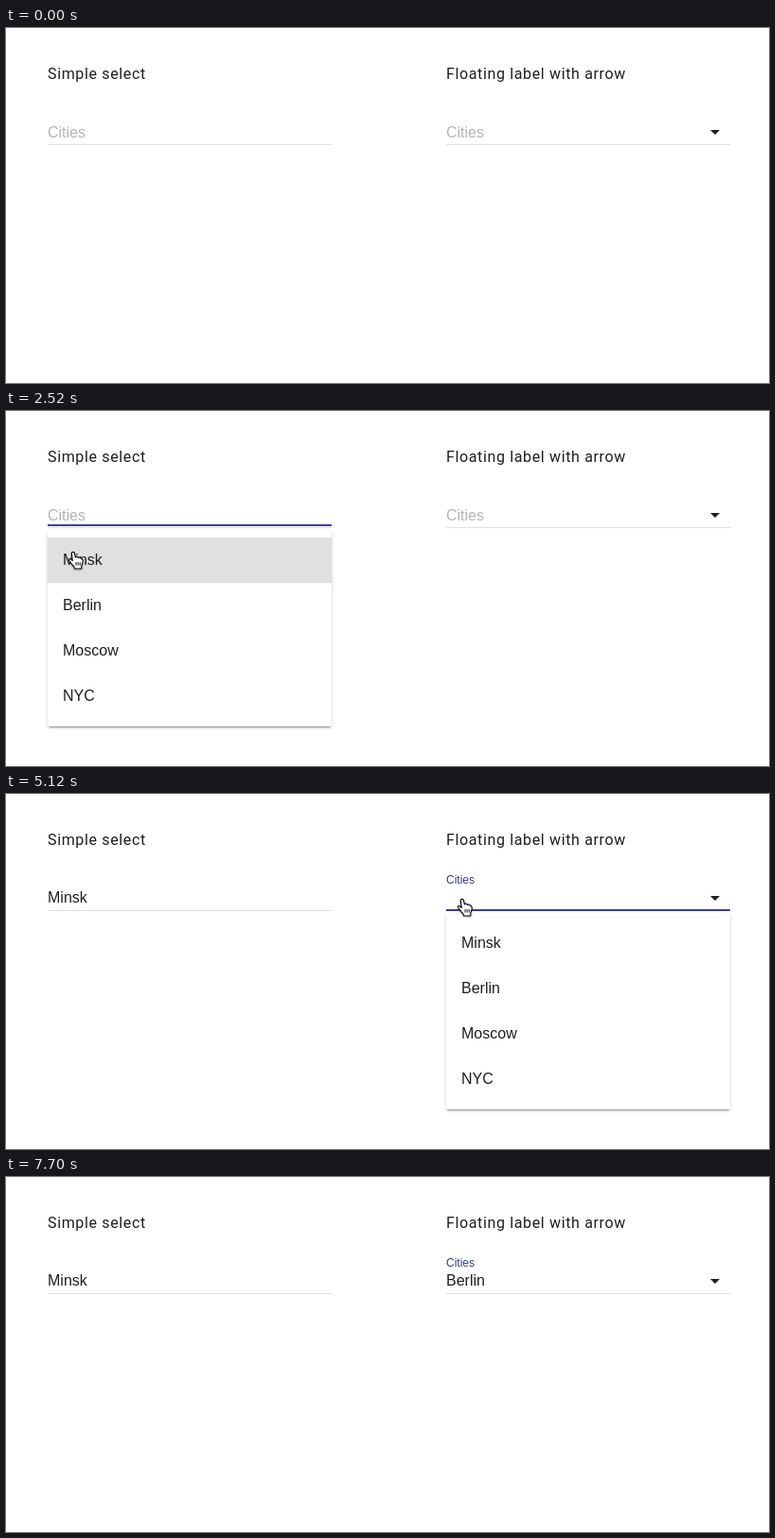
These frames come from a looping animation (806 by 376 pixels, 7.84 s). An HTML page:

```html
<!DOCTYPE html>
<html lang="en">
<head>
<meta charset="utf-8">
<title>Select fields</title>
<style>
  html, body { margin: 0; width: 100%; height: 100%; overflow: hidden; background: #fff; }
  #stage { position: relative; width: 806px; height: 376px; overflow: hidden; }
  svg { position: absolute; left: 0; top: 0; overflow: visible; }
  text { font: 16px "Liberation Sans", Arial, sans-serif; fill: #1e1e1e; }
  .title { font-family: Roboto, sans-serif; letter-spacing: .64px; }
  .hint { fill: #b5b5b5; }
  .rule { fill: #e0e0e0; }
  .focus { fill: #3a4099; transform-box: fill-box; transform-origin: 50% 50%; }
  .menu { position: absolute; top: 126px; width: 300px; height: 208px; }
  .sheet {
    position: absolute; inset: 0; background: #fff; border-radius: 2px; transform-origin: 0 0;
    box-shadow: 0 2px 2px rgba(0,0,0,.14), 0 3px 1px -2px rgba(0,0,0,.2), 0 1px 5px rgba(0,0,0,.12);
  }
  #cursor { filter: drop-shadow(0 1px 1px rgba(0,0,0,.3)); }
  #arrow { fill: #000; stroke: #fff; stroke-width: 2; paint-order: stroke; }
  #hand { fill: #fff; stroke: #000; stroke-width: 1.1; stroke-linejoin: round; }
</style>
</head>
<body>
<div id="stage">
  <svg width="806" height="376">
    <text class="title" x="44" y="54">Simple select</text>
    <text class="title" x="465" y="54">Floating label with arrow</text>
    <text class="hint" id="hint1" x="44" y="116">Cities</text>
    <text class="hint" id="hint2">Cities</text>
    <text id="value1" x="44" y="115">Minsk</text>
    <text id="value2" x="465" y="115">Berlin</text>
    <rect class="rule" x="44" y="123" width="300" height="1"/>
    <rect class="rule" x="465" y="123" width="300" height="1"/>
    <path d="M744 108h10l-5 5z" fill="#1e1e1e"/>
    <rect class="focus" id="focus1" x="44" y="120" width="300" height="2"/>
    <rect class="focus" id="focus2" x="465" y="122" width="300" height="2"/>
  </svg>
  <div class="menu" id="menu1" style="left:44px"></div>
  <div class="menu" id="menu2" style="left:465px"></div>
  <svg width="806" height="376">
    <g id="cursor">
      <path id="arrow" d="M0 0V14L3.2 11L5.5 16.2L7.8 15.2L5.6 10.2H9.8Z"/>
      <g id="hand">
        <path d="M-1.8 1.8Q-1.7.4 -.2.4Q1.2.4 1.5 1.8L2.3 6Q2.8 5 4 5.2Q5.2 5.4 5.5 6.6Q6.2 5.7 7.2 6.1Q8.2 6.5 8.5 7.7Q9.7 7.3 10.1 8.6Q10.4 10.4 9.8 12.2L8.8 15.2V18H1.4L1 16Q-1.8 13.4 -3 11Q-5 8.8 -4.5 7.9Q-3.6 6.8 -1.9 8.4L-.7 9.5Z"/>
        <path d="M3 11v3.6M5.1 11v3.6M7.2 11v3.6" fill="none" stroke-width=".9"/>
      </g>
    </g>
  </svg>
</div>
<script>
  const LOOP = 7840;
  const EASE = 'cubic-bezier(.4,0,.2,1)';
  const HOLD = 'steps(1,end)';
  const CITIES = ['Minsk', 'Berlin', 'Moscow', 'NYC'];
  const $ = id => document.getElementById(id);

  // rows: [time, properties, easing towards the next row]
  function play(el, rows) {
    const all = [[0, rows[0][1], HOLD], ...rows, [LOOP, rows[rows.length - 1][1]]];
    el.animate(
      all.map(([t, props, easing = 'linear']) => ({ ...props, offset: t / LOOP, easing })),
      { duration: LOOP, iterations: Infinity }
    );
  }

  // Shows an element only between the given times
  function show(el, ...spans) {
    const rows = [[0, { opacity: 0 }, HOLD]];
    for (const [from, to] of spans)
      rows.push([from, { opacity: 1 }, HOLD], [to, { opacity: 0 }, HOLD]);
    play(el, rows);
  }

  function tween(el, start, length, from, to) {
    play(el, [[start, from, EASE], [start + length, to]]);
  }

  function underline(el, open, close) {
    const thin = { transform: 'scaleX(.033)', opacity: 1 };
    const full = { transform: 'scaleX(1)', opacity: 1 };
    const none = { ...thin, opacity: 0 };
    play(el, [
      [0, none, HOLD], [open, thin, EASE], [open + 200, full],
      [close, full, EASE], [close + 200, thin, HOLD], [close + 201, none]
    ]);
  }

  // hovers: [row, from, to, pressed]
  function dropdown(menu, open, close, hovers) {
    const rows = CITIES.map((c, i) =>
      `<rect y="${8 + 48 * i}" width="300" height="48" opacity="0"/>` +
      `<text x="16" y="${37 + 48 * i}">${c}</text>`);
    menu.innerHTML = `<div class="sheet"></div><svg width="300" height="208">${rows.join('')}</svg>`;
    const [sheet, list] = menu.children;
    show(menu, [open, close]);
    tween(sheet, open, 300, { transform: 'scale(0)', opacity: 0 }, { transform: 'scale(1)', opacity: 1 });
    tween(list, open, 300, { clipPath: 'inset(0 100% 100% 0)' }, { clipPath: 'inset(0 0 0 0)' });
    list.querySelectorAll('text').forEach((item, i) =>
      tween(item, open + (8 + 48 * i) / 208 * 240, 200, { opacity: 0 }, { opacity: 1 }));
    const bars = list.querySelectorAll('rect');
    for (const [row, from, to, pressed] of hovers) {
      show(bars[row], [from, to]);
      play(bars[row], [[0, { fill: '#ededed' }, HOLD], [pressed || to, { fill: pressed ? '#e0e0e0' : '#ededed' }, HOLD]]);
    }
  }

  dropdown($('menu1'), 1035, 2560, [[0, 2030, 2560, 2440]]);
  dropdown($('menu2'), 4655, 6240, [[0, 5430, 5720], [1, 5720, 6240, 6120]]);
  underline($('focus1'), 1035, 2690);
  underline($('focus2'), 4655, 6355);

  show($('hint1'), [1, 2560]);
  show($('value1'), [2560, LOOP - 1]);
  show($('value2'), [6240, LOOP - 1]);
  play($('hint1'), [[0, { opacity: 1 }, HOLD], [2560, { opacity: 0 }, HOLD]]);
  play($('value1'), [[0, { opacity: 0 }, HOLD], [2560, { opacity: 1 }, HOLD]]);
  play($('value2'), [[0, { opacity: 0 }, HOLD], [6240, { opacity: 1 }, HOLD]]);
  tween($('hint2'), 4655, 200,
    { transform: 'translate(465px,116px)', fontSize: '16px', fill: '#b5b5b5' },
    { transform: 'translate(465px,95px)', fontSize: '12px', fill: '#333d8f' });

  const path = [
    [210, 0, 69, 'ease-out'], [660, 59, 109.5], [1830, 59, 109.5],
    [2000, 67, 134.5, 'ease-out'], [2200, 71, 149], [3470, 71, 149, 'ease-in'],
    [3640, 105, 154], [3800, 200, 156], [4000, 340, 146], [4180, 437.5, 125],
    [4260, 459, 119], [4400, 482, 111], [5140, 482, 111, 'ease-in-out'],
    [5960, 502, 198], [7430, 502, 198, 'ease-in'], [7700, 8, 248]
  ];
  play($('cursor'), path.map(([t, x, y, e]) => [t, { transform: `translate(${x}px,${y}px)` }, e]));
  show($('arrow'), [220, 460], [2760, 4320], [6400, 7700]);
  show($('hand'), [460, 2760], [4320, 6400]);
</script>
</body>
</html>
```
